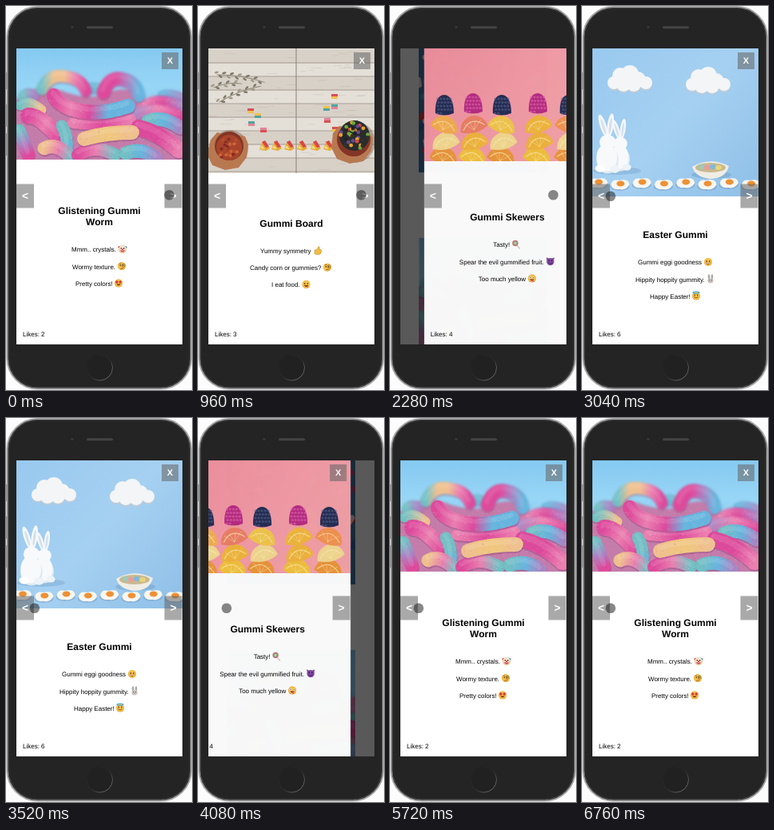
An HTML page that plays this animation: 233x480 px, repeating every 6800 ms.

```html
<!DOCTYPE html>
<html lang="en">
<head>
<meta charset="utf-8">
<title>Gummi gallery</title>
<style>
html, body { margin: 0; width: 100%; height: 100%; overflow: hidden; background: #fcfcfc; }
#stage { display: block; width: 100%; height: 100%; font-family: "Liberation Sans", Arial, sans-serif; text-rendering: geometricPrecision; }
.title { font-size: 12px; font-weight: bold; text-anchor: middle; }
.line { font-size: 8px; }
.mark { font-weight: bold; fill: #fff; text-anchor: middle; }
.soft { filter: blur(1.6px); }
</style>
</head>
<body>
<svg id="stage" viewBox="0 0 233 480"></svg>
<script>
const LOOP = 6800, EXIT = 320, ENTER = 380, WIDTH = 208;

let seed = 7;
const rand = (a = 0, b = 1) => {
  seed = (seed * 16807) % 2147483647;
  return a + (b - a) * seed / 2147483647;
};
const pick = list => list[Math.floor(rand(0, list.length))];
const repeat = (n, fn) => Array.from({ length: n }, (_, i) => fn(i)).join('');

const rect = (x, y, w, h, fill, more = '') =>
  `<rect x="${x}" y="${y}" width="${w}" height="${h}" fill="${fill}" ${more}/>`;
const oval = (x, y, rx, ry, fill, more = '') =>
  `<ellipse cx="${x}" cy="${y}" rx="${rx}" ry="${ry}" fill="${fill}" ${more}/>`;
const dot = (x, y, r, fill, more) => oval(x, y, r, r, fill, more);
const shape = (d, fill, more = '') => `<path d="${d}" fill="${fill}" ${more}/>`;
const stroke = (d, color, w, more = '') =>
  `<path d="${d}" fill="none" stroke="${color}" stroke-width="${w}" stroke-linecap="round" ${more}/>`;
const at = (x, y, body, more = '') => `<g transform="translate(${x} ${y}) ${more}">${body}</g>`;
const crop = (h, body) =>
  `<svg x="13" y="53" width="${WIDTH}" height="${h}" viewBox="13 53 ${WIDTH} ${h}">${body}</svg>`;

let ids = 0;
function gradient(x1, y1, x2, y2, colors) {
  const id = 'g' + ids++;
  const stops = colors.map((c, i) =>
    `<stop offset="${i / (colors.length - 1)}" stop-color="${c}"/>`).join('');
  return [`url(#${id})`, `<linearGradient id="${id}" gradientUnits="userSpaceOnUse"
    x1="${x1}" y1="${y1}" x2="${x2}" y2="${y2}">${stops}</linearGradient>`];
}

// Photos

function worm(d, w, ...colors) {
  const n = d.match(/[\d.]+/g).map(Number);
  const [url, def] = gradient(n[0], n[1], n[n.length - 2], n[n.length - 1], colors);
  return def + at(.5, 2, stroke(d, '#8a3f78', w, 'opacity=".4"')) + stroke(d, url, w) +
    at(-1, -w * .2, stroke(d, '#fff', w * .35, 'opacity=".1"'));
}

function wormPhoto() {
  const [sky, def] = gradient(0, 53, 0, 150, ['#85c9f1', '#98d6f6', '#82c3e8']);
  const pink = '#dd4a9c', rose = '#ea7fb0', peach = '#efc08f', teal = '#72bfc4', blue = '#67b5de', lilac = '#a885c4';
  const back = shape('M5 124Q34 92 70 106T130 108T180 122T230 130V200H5z', '#c47caa') +
    worm('M22 114 Q26 108 34 112', 15, teal, lilac) +
    worm('M196 112 Q206 108 222 116', 13, blue, lilac) +
    worm('M100 104 Q112 98 122 108', 13, blue, teal) +
    worm('M45 104 Q54 84 74 88 Q94 90 100 106', 15, teal, peach, peach, rose, pink) +
    worm('M172 126 Q190 112 220 126', 14, rose, pink, lilac) +
    worm('M122 108 Q130 86 148 92 Q164 96 166 112', 17, pink, pink, lilac, blue) +
    worm('M160 136 Q188 124 218 138', 15, lilac, rose, pink);
  const front = worm('M18 124 Q28 116 44 130', 13, teal, peach) +
    worm('M178 144 Q196 136 218 152', 17, teal, blue, lilac) +
    worm('M84 146 Q120 150 156 142', 14, rose, pink, rose) +
    worm('M28 137 Q42 136 66 164', 20, pink, rose, pink) +
    worm('M16 156 Q22 168 28 186', 17, teal, lilac, pink) +
    worm('M70 150 Q78 162 76 180', 15, teal, teal, blue) +
    worm('M48 178 Q64 170 82 190', 17, peach, rose, teal) +
    worm('M90 186 Q112 172 136 186', 16, pink, rose, teal) +
    worm('M150 184 Q170 176 188 190', 17, teal, blue, lilac) +
    worm('M166 152 Q192 158 216 180', 20, pink, pink, rose) +
    worm('M98 166 Q124 158 158 158', 18, peach, '#f0c77d', peach) +
    worm('M60 112 Q66 124 84 129 Q116 138 153 125', 18, pink, rose, pink, blue, blue);
  return def + rect(13, 53, 208, 139, sky) + `<g class="soft">${back}</g>` + front +
    repeat(520, () => dot(rand(14, 220).toFixed(1), rand(116, 191).toFixed(1), .5,
      pick(['#fff', '#fff', '#7b3f78']), 'opacity=".3"'));
}

function sprig(x, y, angle, n) {
  return at(x, y, stroke(`M0 0 Q${n * 2.5} -5 ${n * 5} 0`, '#8c8473', 1) +
    repeat(n, i => oval(i * 5, (i % 2 ? 2 : -3) - Math.sin(i / n * 3) * 2, 2.7, 1.3,
      i % 3 ? '#7c7868' : '#a09a88', `transform="rotate(${i % 2 ? 24 : -24} ${i * 5} 0)"`)),
    `rotate(${angle})`);
}

function boardPhoto() {
  const cubes = [[66, 131], [75, 137], [67, 147], [82, 155], [171, 113], [161, 128], [171, 126], [162, 143], [172, 154]];
  const colors = ['#d94f54', '#f2c14b', '#4fa5a0', '#e58296'];
  const bowl = (x, y, r) => dot(x + 1, y + 3, r, '#6f5847', 'opacity=".4"') +
    shape(`M${x - r} ${y - 8}l8 -9 9 2 9 -4 8 5 9 2 ${r - 19} 10 -2 16 -10 13 -17 3 -16 -6 -7 -14z`, '#b87951') +
    dot(x, y, r - 5, '#833526');
  return rect(13, 53, 208, 156, '#ddd7ce') +
    repeat(10, i => rect(13, 55 + i * 17, 208, 16, i % 2 ? '#e4dfd7' : '#d8d1c8') +
      rect(13, 70.5 + i * 17, 208, 1, '#a79e95')) +
    repeat(65, () => rect(rand(13, 205), rand(54, 207), rand(4, 16), .5, '#aaa096', 'opacity=".45"')) +
    rect(122.5, 53, 1, 156, '#898078') +
    sprig(24, 86, 9, 12) + sprig(27, 120, -21, 11) + sprig(20, 102, -8, 7) +
    cubes.map(([x, y], i) => rect(x - 4, y - 3, 8, 3, colors[i % 4]) +
      rect(x - 4, y, 8, 3, colors[(i + 1) % 4])).join('') +
    [83, 98, 114, 130, 147, 163].map(x =>
      shape(`M${x - 6} 179l4 -10 4 2 5 7 -5 3z`, '#e5aa37') +
      shape(`M${x - 3} 170l4 -2 5 8 -4 1z`, '#d94747') +
      shape(`M${x - 5} 178l2 -4 4 5z`, '#f6dc79')).join('') +
    bowl(39, 175, 23) + dot(39, 177, 16, '#a7442a') +
    repeat(26, () => dot(rand(27, 51), rand(166, 190), 2, pick(['#b94e2e', '#832b22', '#ce6838']))) +
    bowl(195, 167, 26) + dot(196, 162, 19, '#292c2b') +
    repeat(44, () => {
      const a = rand(0, 6.28), r = rand(2, 18);
      return dot(196 + Math.cos(a) * r, 162 + Math.sin(a) * r, 2.4,
        pick(['#202329', '#2d322d', '#6ea83d', '#d84b3d', '#e9a32e', '#67498b']));
    });
}

function berry(x, y, color, light) {
  return shape(`M${x - 11} ${y + 10}Q${x - 12} ${y - 12} ${x} ${y - 13}Q${x + 12} ${y - 12} ${x + 12} ${y + 10}Q${x} ${y + 15} ${x - 11} ${y + 10}z`, color) +
    repeat(22, i => dot(x - 8 + (i % 5) * 4 + (Math.floor(i / 5) % 2), y - 8 + Math.floor(i / 5) * 4.5, 1.6, light, 'opacity=".6"'));
}

function wedge(x, y, color, tilt) {
  return at(x, y, shape('M-17 5Q-15 -10 1 -12Q16 -10 18 5Q1 14 -17 5z', color) +
    stroke('M-13 3Q0 -12 14 3', '#fff2b4', 1.2, 'opacity=".65"') +
    repeat(4, i => stroke(`M0 6L${-10 + i * 7} -4`, '#fff1b0', .7, 'opacity=".5"')), `rotate(${tilt})`);
}

function skewerPhoto() {
  const [bg, def] = gradient(13, 53, 221, 194, ['#ef8e9d', '#f59ca7', '#f4a4a8']);
  const fruit = ['#f5ad51', '#ed8068', '#f3c74d', '#f3b73e', '#f49452'];
  return def + rect(13, 53, 208, 141, bg) + [38, 74, 110, 155, 194].map((x, i) =>
    rect(x - 1, 110, 2, 84, '#e4b66f') +
    wedge(x - 1, 188, i % 2 ? '#f4c23e' : '#ed963c', 12) +
    wedge(x + 1, 170, i % 2 ? '#f2b53d' : '#f4d991', -14) +
    wedge(x, 149, fruit[i], i % 2 ? -15 : 16) +
    (i % 2 ? berry(x, 122, '#b92c83', '#e56aad') : berry(x, 124, '#252d55', '#586287'))).join('');
}

function cloud(x, y) {
  const puffs = [[-20, 5, 8], [-12, -4, 10], [0, -6, 11], [10, 1, 10], [20, 5, 8], [-8, 7, 9], [5, 7, 9]];
  const layer = (dy, color) => puffs.map(([a, b, r]) => dot(x + a, y + b + dy, r, color)).join('');
  return layer(2, '#bdcbd9') + layer(0, '#f3f5f6');
}

function bunny(x, y, s) {
  const ear = (cx, cy, a) => oval(cx, cy, 4.3, 16, '#f5f7fa', `transform="rotate(${a} ${cx} ${cy})"`) +
    oval(cx, cy + 1, 1.7, 11, '#d4e1ed', `transform="rotate(${a} ${cx} ${cy})"`);
  return at(x, y, ear(-6, -22, -18) + ear(4, -23, 8) + oval(0, 25, 15, 18, '#dfe9f2') +
    oval(-1, 21, 14, 19, '#f7f9fb') + oval(0, 0, 11, 10, '#f7f9fb') +
    oval(-10, 36, 7, 5, '#fff') + oval(10, 37, 7, 5, '#edf3f8'), `scale(${s})`);
}

function easterPhoto() {
  const [bg, def] = gradient(13, 53, 221, 238, ['#99c9ef', '#a5d0f1', '#8fbfe7']);
  return def + rect(13, 53, 208, 185, bg) + cloud(60, 91) + cloud(158, 93) +
    oval(44, 206, 30, 5, '#719fc9', 'opacity=".4"') + bunny(48, 172, .8) + bunny(32, 170, .92) +
    oval(162, 211, 25, 5, '#6e9bc4', 'opacity=".45"') +
    shape('M138 201Q160 188 184 200Q180 216 160 216Q142 214 138 201z', '#efede5') +
    oval(161, 202, 19, 6, '#c9b990') +
    [150, 157, 164, 171].map((x, i) => oval(x, 201 + i % 2, 4, 3,
      ['#9ccbb8', '#ec9c98', '#80b9d8', '#e9d477'][i])).join('') +
    repeat(8, i => {
      const x = 20 + i * 27.3, y = 221 + i % 2 * 2;
      return oval(x, y + 3, 12, 5, '#638fb8', 'opacity=".4"') +
        shape(`M${x - 11} ${y}q2 -7 10 -5q12 -3 13 5q-4 8 -13 6q-9 1 -10 -6z`, '#f8f6f0') +
        oval(x + 1, y - 1, 5, 3.5, '#ee9035');
    });
}

// Emoji, each about 10 px wide

const eyes = (c = '#523015') => oval(-1.8, -1, .7, 1, c) + oval(1.8, -1, .7, 1, c);
const grin = shape('M-2.8 1Q0 5 2.8 1z', '#783515');
const smile = stroke('M-2.3 1.4Q0 3.6 2.3 1.4', '#713b13', .8);
const face = (body, color = '#f8c347') => dot(0, 0, 5, '#e09a3a') + dot(0, -.2, 4.7, color) + body;
const emoji = {
  clown: dot(-3.9, -2.4, 1.7, '#ce4639') + dot(3.9, -2.4, 1.7, '#4784b4') +
    face(eyes() + stroke('M-2.2 1.8Q0 3.8 2.2 1.8', '#c23636', 1.2) + dot(0, .3, 1.1, '#d7322d'), '#f1e5d6'),
  monocle: face(eyes() + dot(2, -1, 2, 'none', 'stroke="#775b3a" stroke-width=".7"') +
    stroke('M-1.5 3Q0 2 2 2.8', '#713b13', .7) + stroke('M-3.2 -3L-1 -3.4', '#713b13', .6)),
  hearts: face(dot(-2.2, -1.6, 1.7, '#db3040') + dot(2.2, -1.6, 1.7, '#db3040') + grin),
  thumb: shape('M-4 -.5L-1 -1 1 -5Q3 -5 2 -1H4Q6 1 4 2Q5 4 2 5H-2L-4 4z', '#f2bd40', 'stroke="#bd812a" stroke-width=".5"'),
  yum: face(eyes() + grin + oval(1.8, 3, 1.2, 1, '#e46674')),
  candy: stroke('M0 0L4.5 5', '#c4b59b', 1.1) + dot(-1, -1.5, 3.7, '#db6c74') +
    dot(-1, -1.5, 2.4, '#75b59a') + dot(-1, -1.5, 1.2, '#f2d26d'),
  imp: shape('M-5 -5L-1 -3 -4 0zM5 -5L1 -3 4 0z', '#703b91') + dot(0, .3, 4.7, '#8548a4') +
    eyes('#321348') + stroke('M-2.3 2Q0 4 2.3 2', '#321348', .8),
  zany: face(dot(-2, -1.3, 1.5, '#fff') + dot(2, -1, 1.1, '#fff') + dot(-2, -1.3, .7, '#503015') +
    dot(2, -1, .6, '#503015') + grin + oval(1, 3, 1.2, 1.3, '#e36577')),
  happy: face(eyes() + shape('M-3 .7Q0 5.5 3 .7z', '#783515') + rect(-2, 1, 4, .8, '#fff')),
  rabbit: oval(-2, -3, 1.3, 3, '#aaa') + oval(2, -3, 1.3, 3, '#aaa') +
    oval(0, 2, 3.6, 3.2, '#c9c6c2') + oval(-1.4, 1.3, .5, .7, '#333') + oval(1.4, 1.3, .5, .7, '#333') + dot(0, 3, .7, '#c77780'),
  angel: face(eyes() + smile) + oval(0, -4.3, 4, 1.2, 'none', 'stroke="#49a7d3" stroke-width="1.1"')
};

// Slides: lines are [text, x, emoji, emoji x]

const slides = [
  { photo: crop(139, wormPhoto()), title: ['Glistening Gummi', 'Worm'], y: 260, likes: 2,
    lines: [['Mmm.. crystals.', 82, 'clown', 146], ['Wormy texture.', 83, 'monocle', 145], ['Pretty colors!', 87, 'hearts', 141]] },
  { photo: crop(156, boardPhoto()), title: ['Gummi Board'], y: 275.5, likes: 3,
    lines: [['Yummy symmetry', 78, 'thumb', 150], ['Candy corn or gummies?', 65, 'monocle', 162], ['I eat food.', 92, 'yum', 135.5]] },
  { photo: crop(141, skewerPhoto()), title: ['Gummi Skewers'], y: 268, likes: 4,
    lines: [['Tasty!', 99.5, 'candy', 128], ['Spear the evil gummified fruit.', 57, 'imp', 171], ['Too much yellow', 81, 'zany', 148]] },
  { photo: crop(185, easterPhoto()), title: ['Easter Gummi'], y: 290, likes: 6,
    lines: [['Gummi eggi goodness', 70, 'happy', 158], ['Hippity hoppity gummity.', 67, 'rabbit', 161], ['Happy Easter!', 85, 'angel', 143]] }
];

const text = (x, y, cls, s, more = '') => `<text x="${x}" y="${y}" class="${cls}" ${more}>${s}</text>`;
const button = (x, y, w, h, s, size) => rect(x, y, w, h, '#666', 'opacity=".56"') +
  text(x + w / 2, y + h / 2 + size * .35, 'mark', s, `font-size="${size}"`);

function panel(s) {
  const first = s.y + (s.title.length - 1) * 14 + 33;
  return `<g class="panel">${rect(13, 53, 208, 370, '#fff')}${s.photo}` +
    s.title.map((t, i) => text(117, s.y + i * 14, 'title', t)).join('') +
    s.lines.map(([t, x, e, ex], i) => text(x, first + i * 21.3 + .2, 'line', t) +
      at(ex, first + i * 21.3 - 3, emoji[e])).join('') +
    text(21, 413, 'line', 'Likes: ' + s.likes) +
    button(195, 58, 21, 21, 'X', 11) +
    button(13, 222.5, 22, 30, '&lt;', 14) +
    button(198.5, 222.5, 22, 30, '&gt;', 14) + '</g>';
}

const underlay = rect(13, 53, 208, 370, '#fff') +
  rect(36, 53, 161, 155, '#3b78a8') +
  `<g clip-path="url(#card)">` + repeat(130, () => {
    const x = rand(36, 197), y = rand(55, 206);
    return stroke(`M${x} ${y}l${rand(-9, 9)} ${rand(-9, 9)}`,
      pick(['#d63d45', '#3f9bd6', '#f0e6dd', '#c93b68', '#2c64a8']), 7);
  }) + at(24, 239, wormPhoto(), 'scale(.96)') + '</g>' +
  rect(13, 53, 208, 370, '#000', 'opacity=".65"');

const [ring, ringDef] = gradient(106, 440, 129, 464, ['#202020', '#2c2c2c', '#6a6a6a']);
const phone = ringDef +
  rect(0, 83, 2, 21, '#777') + rect(0, 123, 2, 28, '#777') + rect(0, 159, 2, 28, '#777') +
  rect(1.5, 1, 230.5, 477.5, '#242424', 'rx="38" stroke="#a4a4a4" stroke-width="2"') +
  rect(3.2, 2.7, 227, 474, 'none', 'rx="36.5" stroke="#444" stroke-width="1"') +
  dot(83, 26.5, 1.7, '#36363b') + rect(101, 25.2, 33, 3, '#444', 'rx="1.5"') +
  dot(117.5, 452, 16, '#212121', `stroke="${ring}" stroke-width="1"`);

const stage = document.getElementById('stage');
stage.innerHTML = `<clipPath id="screen">${rect(13, 53, 208, 370, '#000')}</clipPath>
  <clipPath id="card">${rect(36, 53, 161, 155, '#000')}${rect(36, 290, 161, 133, '#000')}</clipPath>
  ${phone}<g clip-path="url(#screen)">${underlay}${slides.map(panel).join('')}</g>
  <circle id="pointer" r="6.3" fill="#111" opacity=".5"/>`;
const panels = [...stage.querySelectorAll('.panel')];
const pointer = document.getElementById('pointer');

// [click time, slide shown next, direction]
const clicks = [[250, 1, 1], [1725, 2, 1], [2330, 3, 1], [3525, 2, -1], [4290, 1, -1], [5000, 0, -1]];

function pose(t) {
  let shown = 0;
  for (const [start, next, dir] of clicks) {
    const age = t - start;
    if (age < 0) break;
    if (age < EXIT) {
      const p = (age / EXIT) ** 2;
      return [shown, -dir * p * WIDTH, 1 - p];
    }
    shown = next;
    if (age < EXIT + ENTER) {
      const rest = (1 - (age - EXIT) / ENTER) ** 2;
      return [shown, dir * rest * WIDTH, 1 - rest ** 1.7];
    }
  }
  return [shown, 0, 1];
}

function draw() {
  const t = performance.now() % LOOP;
  const [shown, x, alpha] = pose(t);
  panels.forEach((p, i) => p.setAttribute('display', i === shown ? 'inline' : 'none'));
  panels[shown].setAttribute('transform', `translate(${x} 0)`);
  panels[shown].setAttribute('opacity', alpha);
  const u = Math.min(1, Math.max(0, (t - 2560) / 420));
  const k = u * u * (3 - 2 * u);
  pointer.setAttribute('cx', 204.5 - 168.7 * k);
  pointer.setAttribute('cy', 236.3 + 1.4 * k);
  requestAnimationFrame(draw);
}
draw();
</script>
</body>
</html>
```
